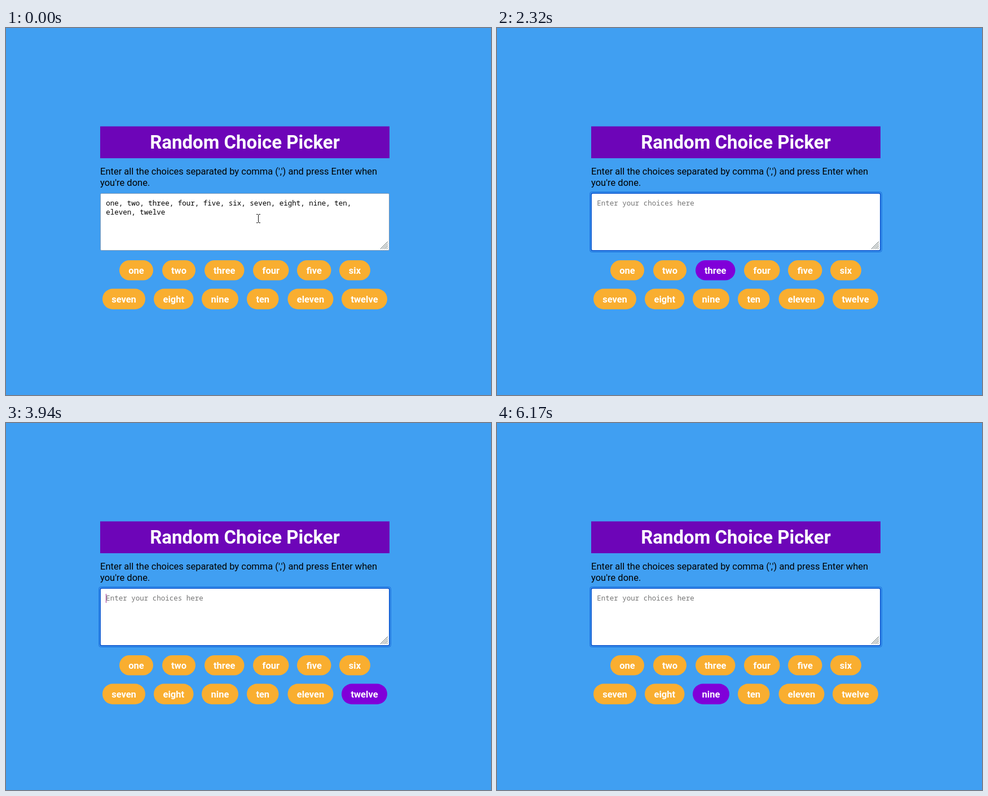
An HTML page that plays this animation: 860x651 px, repeating every 6340 ms.

```html
<!DOCTYPE html>
<html lang="en">
<head>
<meta charset="utf-8">
<title>Random Choice Picker</title>
<style>
  html, body { margin: 0; width: 100%; height: 100%; overflow: hidden; background: #409ff2; }
  svg { display: block; width: 860px; height: 651px; font: 16.5px Roboto, sans-serif; }
  .title { font-size: 33px; font-weight: 700; fill: #fff; text-anchor: middle; }
  .mono { font: 12.5px "Noto Sans Mono", monospace; white-space: pre; }
  .tag rect { fill: #f9ae30; }
  .tag.on rect { fill: #8000d9; }
  .tag text { font-weight: 700; fill: #fff; text-anchor: middle; }
</style>
</head>
<body>
<svg viewBox="0 0 860 651">
  <rect width="860" height="651" fill="#409ff2"/>
  <rect x="167" y="174.5" width="513" height="56.5" fill="#6d05b8"/>
  <text class="title" x="423.5" y="214.3">Random Choice Picker</text>
  <text x="167" y="260">Enter all the choices separated by comma (',') and press Enter when</text>
  <text x="167" y="279.5">you're done.</text>

  <rect id="ring" x="164.5" y="290.5" width="518" height="107" rx="4" fill="none" stroke="#1c6fdc"/>
  <rect x="167.5" y="293.5" width="512" height="101" rx="2" fill="#fff" stroke="#7c97b5"/>
  <rect id="edge" x="167" y="293" width="513" height="102" rx="2.5" fill="none" stroke="#1560d4" stroke-width="2"/>
  <path d="M664 392l13-13m-9.5 13l9.5-9.5m-6 9.5l6-6m-2.5 6l2.5-2.5" stroke="#4d5b5b" fill="none"/>

  <g id="typed" class="mono">
    <text x="177.3" y="315">one, two, three, four, five, six, seven, eight, nine, ten,</text>
    <text x="177.3" y="331">eleven, twelve</text>
  </g>
  <text id="hint" class="mono" x="177.3" y="315" fill="#757575">Enter your choices here</text>
  <rect id="caret" width="1" height="16"/>
  <g id="tags"></g>
  <path id="beam" d="M-3.5-7.5h2.5l1 1l1-1h2.5M0-6.5v13M-3.5 7.5h2.5l1-1l1 1h2.5" fill="none"/>
  <path id="arrow" d="M825.5 318.5v15l3.4-3.2l2.4 5.4l2.3-1l-2.4-5.3h4.6z" fill="#fff" stroke="#10141c"/>
</svg>
<script>
const LOOP = 6340, CLEARED = 1840;
const $ = id => document.getElementById(id);

// label, left, right
const rows = [
  [412, 35.5, [['one', 201, 261], ['two', 277, 336], ['three', 352, 422.5],
    ['four', 438, 501.5], ['five', 516, 576.5], ['six', 591, 646]]],
  [462.5, 36.5, [['seven', 171, 247], ['eight', 262, 332.5], ['nine', 347, 412],
    ['ten', 427, 483.5], ['eleven', 499.5, 580.5], ['twelve', 595, 676]]]
];

const tags = {};
function svg(name, attrs, parent) {
  const el = document.createElementNS('http://www.w3.org/2000/svg', name);
  for (const key in attrs) el.setAttribute(key, attrs[key]);
  return parent.appendChild(el);
}
for (const [y, height, row] of rows) {
  for (const [label, left, right] of row) {
    const g = svg('g', { class: 'tag' }, $('tags'));
    svg('rect', { x: left, y, width: right - left, height, rx: height / 2 }, g);
    svg('text', { x: (left + right) / 2, y: y + 23.5 + (height - 35.5) / 2 }, g).textContent = label;
    tags[label] = g;
  }
}

// Runs of picks: start time, then one pick every 80 ms
const runs = [
  [1840, 'one four two six five two three one'],
  [2480, 'four ten six eleven eight five nine two'],
  [3120, 'twelve three seven one nine'],
  [3540, 'six eight four'],
  [3780, 'seven ten twelve five eleven one three two'],
  [4420, 'five'],
  [4590, 'twelve seven four ten nine']
].map(([start, words]) => [start, words.split(' ')]);

// Caret turns on and off at alternate times
const blinks = [410, 910, 1510, 1840, 2560, 3040, 3540, 4060, 4590, 5080, 5660, 6170];

const show = (id, on) => $(id).setAttribute('visibility', on ? 'visible' : 'hidden');
const steps = (t, ...times) => times.filter(at => t >= at).length;

function picked(t) {
  const run = runs.filter(([start]) => t >= start).pop();
  if (!run) return null;
  const [start, words] = run;
  return words[Math.min(words.length - 1, Math.floor((t - start) / 80))];
}

function draw(t) {
  const cleared = t >= CLEARED;
  const move = steps(t, 80, 160, 240) / 3;
  $('edge').setAttribute('opacity', move);
  $('ring').setAttribute('opacity', steps(t, 410, 500) / 2);

  show('typed', !cleared);
  show('hint', cleared);
  show('beam', !cleared);
  $('beam').setAttribute('transform', `translate(${447.5 - 20 * move} ${338 - 5 * move})`);
  $('beam').setAttribute('stroke', move < 1 ? '#111' : '#2b568c');
  show('arrow', t >= 4340 && t < 4420);

  show('caret', steps(t, ...blinks) % 2);
  $('caret').setAttribute('x', cleared ? 177 : 283);
  $('caret').setAttribute('y', cleared ? 303 : 319);
  $('caret').setAttribute('fill', cleared ? '#9a2f93' : '#000');

  const choice = picked(t);
  for (const label in tags) tags[label].classList.toggle('on', label === choice);
}

const origin = performance.now();
function tick() {
  draw((performance.now() - origin) % LOOP);
  requestAnimationFrame(tick);
}
tick();
</script>
</body>
</html>
```
